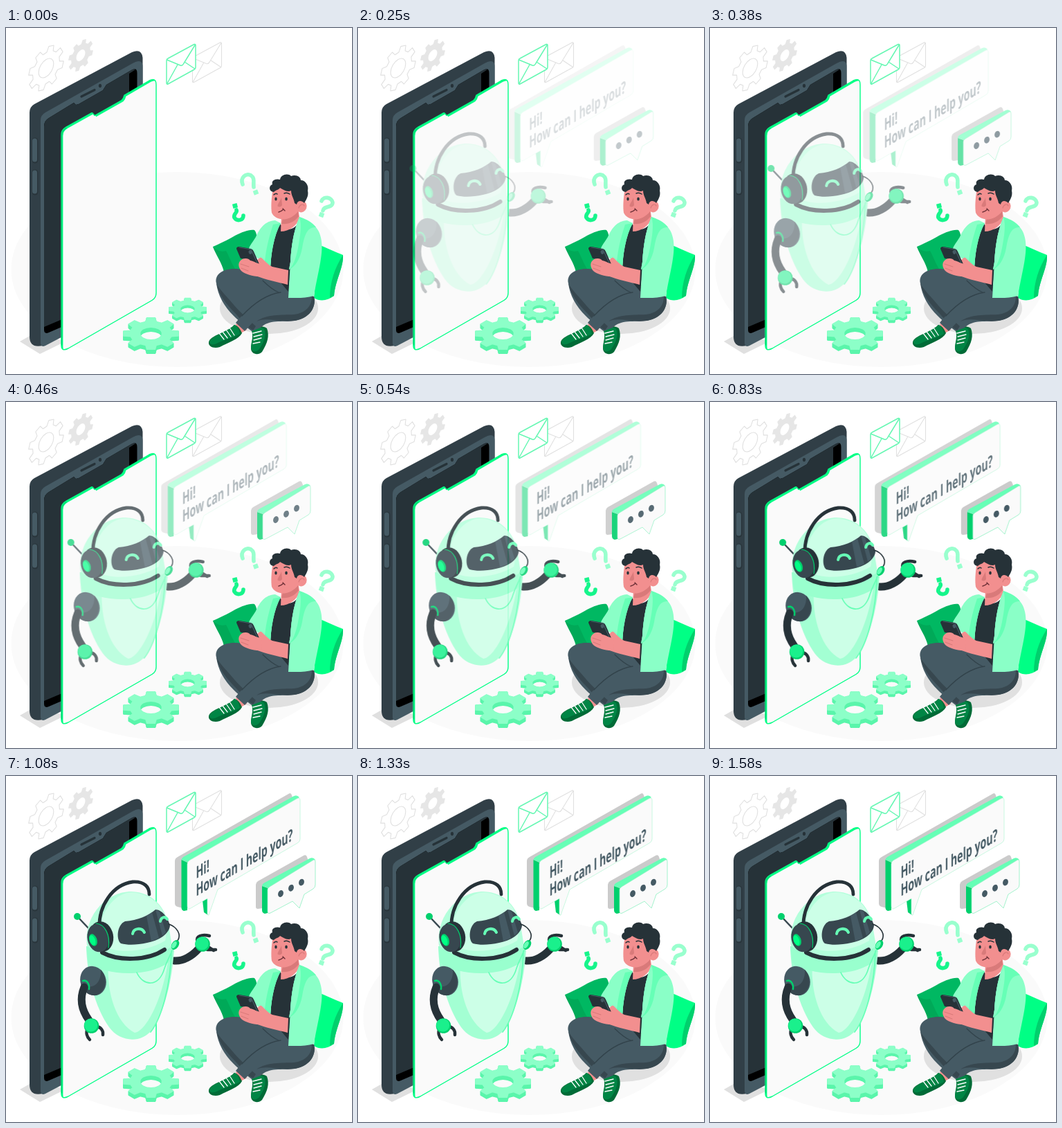
Write an HTML page with a canvas that moves like this. It is 500 px wide and 500 px high and loops after 1.62 s.

```html
<!DOCTYPE html>
<html lang="en">
<head>
<meta charset="utf-8">
<title>Robot assistant</title>
<style>
html, body { margin: 0; width: 100%; height: 100%; overflow: hidden; background: #fff; }
canvas { display: block; width: 500px; height: 500px; }
</style>
</head>
<body>
<canvas id="stage"></canvas>
<script>
const SIZE = 500, LOOP = 1620;
const C = {
  green: '#00ff85', mid: '#00d06d', deep: '#00a958', shoe: '#008545', forest: '#006b37',
  mint: '#99ffce', jacket: '#8affc7', pale: '#ccffe7', fresh: '#66ffb6',
  ink: '#263238', side: '#313f47', slate: '#37474f', steel: '#455a64',
  skin: '#f28f8f', blush: '#d97a7a', paper: '#fafafa', gray: '#e0e0e0', shadow: '#cbcbcb'
};
const ratio = window.devicePixelRatio || 1;
let g;

function prepare(canvas) {
  canvas.width = canvas.height = SIZE * ratio;
  const ctx = canvas.getContext('2d');
  ctx.scale(ratio, ratio);
  ctx.lineCap = ctx.lineJoin = 'round';
  return ctx;
}

function layer(draw) {
  const canvas = document.createElement('canvas');
  g = prepare(canvas);
  draw();
  return canvas;
}

function fill(color, path) {
  g.fillStyle = color;
  g.fill(new Path2D(path));
}

function line(color, width, path) {
  g.strokeStyle = color;
  g.lineWidth = width;
  g.stroke(new Path2D(path));
}

function oval(color, x, y, rx, ry = rx, turn = 0) {
  g.fillStyle = color;
  g.beginPath();
  g.ellipse(x, y, rx, ry, turn, 0, Math.PI * 2);
  g.fill();
}

// Cog outline with a round hole, seen on a plane given by a 2x2 matrix.
function cog(x, y, radius, teeth, hole, plane, turn = 0) {
  const flat = new Path2D(), step = Math.PI * 2 / teeth;
  for (let i = 0; i < teeth; i++) {
    for (const [part, r] of [[-.32, .76], [-.19, 1], [.19, 1], [.32, .76]]) {
      const a = turn + (i + part) * step;
      flat.lineTo(radius * r * Math.cos(a), radius * r * Math.sin(a));
    }
  }
  flat.closePath();
  flat.moveTo(hole, 0);
  flat.arc(0, 0, hole, 0, Math.PI * 2);
  const path = new Path2D();
  path.addPath(flat, new DOMMatrix([...plane, x, y]));
  return path;
}

function floorCog(x, y, radius, hole, depth) {
  for (let d = depth; d >= 0; d -= .5) {
    const path = cog(x, y + d, radius, 8, hole, [1, 0, 0, .577]);
    g.fillStyle = g.strokeStyle = d ? '#5af5ab' : '#8cffc8';
    g.lineWidth = 1.5;
    g.fill(path, 'evenodd');
    g.stroke(path);
  }
}

function backdrop() {
  const wall = [.866, -.5, 0, 1];
  g.fillStyle = '#fff';
  g.fillRect(0, 0, SIZE, SIZE);
  oval(C.paper, 247.5, 349, 240, 141);

  g.strokeStyle = C.gray;
  g.lineWidth = 1.1;
  g.stroke(cog(58, 58, 29.5, 8, 12.5, wall, .3));
  g.fillStyle = '#e6e6e6';
  g.fill(cog(108, 39.5, 21, 8, 7.5, wall, .3), 'evenodd');

  const letter = 'M232 47Q232 45 234 44L272 23.5Q274 23 274 25V57Q274 59 272 60L234 81Q232 82 232 79ZM232.5 46L252 54Q255 55 257 51L273.5 24M233 80L248 53M273 59L258 49';
  g.save();
  g.translate(37.5, -2.5);
  line(C.gray, 1.1, letter);
  g.restore();
  fill('#fff', letter);
  line('#66f7b3', 1.5, letter);
}

function phone() {
  fill(C.gray, 'M20 453L36 444L88 452L49 471Z');
  fill(C.side, 'M34 122Q34 114 41 110L182 35Q196 29 197.5 43V385L53 459Q34 463 34 446Z');
  fill(C.steel, 'M50 133Q50 126 57 122L183 51Q197.5 43 197.5 56V385L57 459Q50 462 50 455Z');
  const screen = 'M55 142Q55 134 62 130L98 108L101 111L105 110L140 90L145 82L181 61Q189.5 56 189.5 65V385L62 440Q55 443 55 436Z';
  fill('#000', screen);
  g.save();
  g.clip(new Path2D(screen));
  fill(C.ink, 'M50 50H178V380L50 434Z');
  fill(C.ink, 'M178 50H190V58L178 66Z');
  g.restore();
  line(C.ink, 3.2, 'M109 99L128 89.5');
  oval(C.ink, 136, 83.5, 2.1, 2.8);
  for (const y of [161, 207]) {
    line('#29353b', 9, `M42 ${y + 2}V${y + 30}`);
    line(C.steel, 7, `M41.5 ${y + 2}V${y + 29}`);
  }

  const panel = 'M80 154Q80 147 87 143L123 123Q125 122 126 124L128 126.5L167 104.5Q170 102 171 97L207 76Q217 71 217 82V383Q217 390 211 393.5L90 463Q80 468 80 459Z';
  fill(C.green, panel);
  g.save();
  g.clip(new Path2D(panel));
  g.translate(2.4, 1.8);
  fill(C.paper, panel);
  g.restore();
  line(C.green, 1.4, panel);
  line(C.mid, 1.2, 'M80.5 458V155Q81 148 87 144.5');
}

function questionMark(color, hook, x, y, turn) {
  line(color, 5.6, hook);
  g.save();
  g.translate(x, y);
  g.rotate(turn);
  g.fillStyle = color;
  g.fillRect(-3.4, -3.2, 6.8, 6.4);
  g.restore();
}

function shoes() {
  fill(C.skin, 'M332 428L342 424L348 436L338 442Z');
  fill(C.forest, 'M330 429C335 430 338 434 341 441C336 450 322 454 309 461C300 464 292 460 293 454C295 444 318 441 330 429Z');
  fill(C.shoe, 'M330 429C337 432 337 440 338 442C328 448 315 450 304 456C298 459 294 457 294 453C298 444 318 441 330 429Z');
  line('#fff', 1.3, 'M308 441L315 450M313 439L320 448M318 436L325 446M323 433L330 444');
  fill(C.skin, 'M356 429L371 427L370 439L356 440Z');
  fill(C.forest, 'M355 437C360 431 371 429 377 434C381 445 378 455 370 468C364 474 354 471 354 463C354 454 358 447 355 437Z');
  fill(C.shoe, 'M355 437C360 433 368 431 373 435C377 444 373 454 366 464C361 470 354 467 354 462C355 453 359 447 355 437Z');
  line('#fff', 1.3, 'M357 441L369 438M358 446L370 443M358 451L369 448M357 456L367 454');
}

function legs() {
  fill(C.steel, 'M304 369C301 357 312 348 330 348C350 348 380 356 409 374L445 388C449 404 438 420 417 423C398 425 380 421 368 433L355 438C345 430 338 425 329 416C315 402 306 386 304 369Z');
  fill(C.slate, 'M304 369C308 386 318 399 332 413L347 430L357 437L361 431C348 419 335 408 324 394C317 386 308 377 304 369Z');
  fill(C.steel, 'M445 388C447 402 436 418 416 423C395 424 374 416 357 425L345 438L332 426C347 407 370 389 393 382Z');
  fill(C.slate, 'M445 388C449 404 438 420 417 423C394 426 377 417 362 424C377 413 398 415 416 414C433 412 442 402 442 388Z');
  line('#32434b', 1.3, 'M341 416C355 401 375 385 397 382M394 382C384 378 377 371 371 365');
}

function head() {
  fill(C.skin, 'M398 270L422 259L424 274C421 286 409 294 397 294Z');
  fill(C.blush, 'M400 276C410 276 417 271 422 265L423 272C417 280 409 284 398 283Z');
  fill(C.skin, 'M386 232C383 247 383 260 384 267C387 274 397 278 405 276C415 274 423 266 428 254L424 224L397 221Z');
  oval(C.skin, 427, 258, 7.5, 8.5, .3);
  line(C.blush, 1.2, 'M423 260C425 254 430 254 431 257');
  fill(C.ink, 'M387 237C380 237 379 228 385 226C383 220 390 217 396 219C397 212 407 209 412 214C419 211 426 215 426 220C433 220 438 228 436 235C438 243 433 249 431 253C426 248 421 250 420 255L417 253C416 246 412 242 412 235C406 238 400 233 396 231C394 234 390 234 387 237Z');
  fill(C.blush, 'M398 245C396 251 391 256 393 258C396 259 398 258 399 256Z');
  oval(C.ink, 390, 247, 1.7, 2.5);
  oval(C.ink, 405, 247, 1.8, 2.6);
  line(C.ink, 1.5, 'M387 241Q390 238 392 240M402 239Q406 237 410 240');
  line('#6d3037', 1.4, 'M394 266Q398 265 401 262M400 261L403 264');
}

function pillows() {
  fill('#00b862', 'M299 316C308 312 321 306 331 300C342 295 350 291 359 292C364 298 361 305 366 315L354 354L315 352C312 339 304 329 299 316Z');
  fill(C.deep, 'M299 316C304 322 311 324 318 322C323 331 327 343 333 351L315 352C312 339 304 329 299 316Z');
  fill(C.green, 'M452 313C462 317 476 324 487 328C488 346 476 364 474 387C465 394 454 396 445 390Z');
  fill(C.mid, 'M487 328C488 346 476 364 474 387L468 390C468 368 475 346 487 328Z');
}

function person() {
  oval(C.gray, 380, 405, 71, 37);
  pillows();
  shoes();
  legs();
  fill(C.ink, 'M395 282C386 303 382 330 382 350L408 381L413 338L424 280C412 298 401 289 395 282Z');
  head();
  fill(C.jacket, 'M389 278C374 279 367 289 361 302C355 312 349 317 351 324L370 337L382 353C382 329 387 300 397 282Z');
  fill(C.fresh, 'M386 284C381 300 376 316 374 338L382 353C382 329 387 300 397 282Z');
  fill(C.jacket, 'M424 273C437 278 452 286 455 303C460 324 451 351 445 387C432 391 419 390 408 390L411 338C413 310 416 294 424 273Z');
  fill(C.fresh, 'M424 273C434 276 443 281 448 288C434 287 431 302 428 318C425 334 418 345 409 349L411 338C413 310 416 294 424 273Z');
  fill(C.jacket, 'M424 273C428 284 425 302 422 318C419 333 415 344 409 349L411 338C413 310 416 294 424 273Z');
  fill(C.skin, 'M408 350L407 371C393 367 375 364 361 358C353 355 345 355 340 350C336 345 337 335 344 333L355 337C363 340 365 330 369 332C373 335 378 342 385 345Z');
  fill(C.ink, 'M333 319Q333 316 337 316L354 319Q357 320 358 323L369 348Q369 351 365 351L355 351L348 334L339 333Z');
  line(C.steel, 1.2, 'M337 317L354 320L367 348');
  oval(C.steel, 353, 324, 2.3, 3, -.3);
  fill(C.skin, 'M338 337C342 332 350 332 353 336C359 337 363 341 369 341L370 359C359 360 346 356 340 351C336 346 335 341 338 337Z');
  line(C.blush, 1.1, 'M339 341L351 345M340 347L350 351');
  questionMark(C.mint, 'M342 226C338 216 347 209 354 213C360 217 357 223 358 230', 361, 237.5, -.35);
  questionMark(C.mint, 'M456 250C459 242 471 245 472 252C472 261 459 256 458 264', 456, 270, .35);
  questionMark('#16f58b', 'M343 271C343 278 334 280 330 274C328 268 335 267 333 263', 331, 257, -.25);
}

function wrist(x, y) {
  oval(C.mid, x, y, 10.8);
  oval('#1af08c', x - .8, y - 1, 9.6);
}

function robot() {
  line(C.ink, 11, 'M243 267C256 268 269 260 278 250');
  line(C.ink, 4.5, 'M277 239C273 232 283 228 294 231M291 251L303 251M292 247L300 252');
  wrist(284, 243);

  line(C.slate, 2.5, 'M104 204L123 224');
  oval(C.mid, 103, 203, 5);
  fill('#a3ffd3', 'M116 246C117 290 129 335 149 363C164 384 194 387 210 368C228 344 241 295 243 247Z');
  fill(C.pale, 'M148 270C145 315 160 358 186 371C204 368 227 318 234 268Z');
  fill(C.mint, 'M116 246L243 247L241 264C214 292 146 290 119 270Z');
  line(C.fresh, 1.7, 'M189 284C198 304 221 306 229 278C233 266 237 260 240 252M239 253C238 302 225 350 209 370');

  fill('#b3ffdb', 'M117 245C112 202 145 167 181 167C213 168 230 190 235 216L240 246C210 269 143 270 117 245Z');
  fill(C.pale, 'M139 205C148 182 164 169 181 168C212 170 229 190 234 216L230 238C204 254 161 258 140 245Z');
  line(C.ink, 6, 'M139 255C163 268 205 267 229 251');
  fill(C.slate, 'M172 210C190 209 207 201 216 193C225 193 234 204 237 216C236 228 221 238 204 241C190 244 177 245 166 242C159 237 160 215 172 210Z');
  fill(C.steel, 'M203 202L211 197L221 234L210 239ZM216 193L222 196L231 226L226 231Z');
  line(C.fresh, 4, 'M183 228C184 220 196 218 200 226M223 210C224 204 230 202 233 207');

  line(C.ink, 4.8, 'M135 218C134 189 153 157 183 153C201 152 207 161 207 171');
  oval(C.ink, 138, 232, 17, 22, -.2);
  oval(C.slate, 133, 234, 15.5, 20.5, -.2);
  line(C.mid, 1.2, 'M130 213C143 214 151 230 148 248');
  oval(C.mid, 126, 237, 5.5, 9, -.35);
  oval(C.green, 125, 237.5, 4, 7.5, -.35);
  line(C.ink, 1.6, 'M235 214C247 218 254 229 248 238');
  oval(C.mid, 244.5, 244, 5, 7.5, .55);
  oval(C.fresh, 243, 244, 3, 5.5, .55);

  oval(C.steel, 126, 296, 18.5, 21.5, -.35);
  fill(C.slate, 'M137 280C148 292 145 312 130 317C118 318 111 310 108 300C122 310 138 303 137 280Z');
  line(C.mid, 2.5, 'M111 296C117 294 121 301 120 308');
  line(C.ink, 11, 'M113 305C106 322 109 338 120 353');
  line(C.ink, 4.5, 'M118 365C115 371 117 377 121 381M130 362C136 362 141 367 140 374');
  wrist(123.5, 361);
}

function speech() {
  fill(C.shadow, 'M244 123Q244 119 248 117L408 26Q412 23 413 28L417 40L260 192L248 189Q244 188 244 184Z');
  fill(C.mid, 'M253.5 121L262 125V194L257 195Q253.5 194 253.5 190Z');
  fill(C.fresh, 'M253.5 121Q254 118 258 116L416 29Q421 27 424 31L263 125Z');
  fill(C.mid, 'M284 180L286 197L292 201L294 176Z');
  const face = 'M262 127Q262 124 265 122L420 33Q425 30 425 35V91Q425 95 421 97L306 164L293 201Q291 202 291 199V177L267 191Q262 194 262 188Z';
  fill(C.paper, face);
  line('#b4f5d5', .7, face);
}

// Lettering lies in the plane of the speech bubble.
function lettering() {
  g.fillStyle = C.steel;
  g.font = '700 24px "Open Sans", "Noto Sans", sans-serif';
  [['Hi!', 148.5], ['How can I help you?', 174]].forEach(([text, y]) => {
    g.save();
    g.transform(.59, -.342, 0, 1, 274.5, y);
    g.fillText(text, 0, 0);
    g.restore();
  });
}

function typing() {
  fill(C.shadow, 'M361 157Q361 154 364 152L430 115Q434 113 435 117L438 126L378 190L364 192Q361 192 361 189Z');
  fill(C.mid, 'M370 159L378 162V198L374 199Q370 198 370 194Z');
  fill(C.fresh, 'M370 159Q370 156 374 154L439 119Q444 117 447 121L379 162Z');
  const face = 'M378 164Q378 162 381 160L443 122Q447 119 447 124V157Q447 161 444 163L431 171L424 191L414 181L382 198Q378 200 378 195Z';
  fill(C.paper, face);
  line('#8cf0c0', .8, face);
  for (const i of [0, 1, 2]) oval(C.steel, 397 + 15 * i, 170 - 8.2 * i, 3.8, 5, .35);
}

const scene = layer(() => {
  backdrop();
  phone();
  floorCog(209.5, 441.5, 40, 16, 6);
  floorCog(262.5, 406, 27, 11, 4);
  person();
});
const robotLayer = layer(robot);
const speechLayer = layer(speech);
const textLayer = layer(lettering);
const typingLayer = layer(typing);

// cubic-bezier(.36, -.01, .5, 1.38): slides in and overshoots a little.
function ease(x) {
  if (x <= 0) return 0;
  if (x >= 1) return 1;
  const curve = (s, a, b) => 3 * a * s * (1 - s) ** 2 + 3 * b * s * s * (1 - s) + s ** 3;
  let low = 0, high = 1;
  for (let i = 0; i < 24; i++) {
    const s = (low + high) / 2;
    if (curve(s, .36, .5) < x) low = s; else high = s;
  }
  return curve(low, -.01, 1.38);
}

const stage = prepare(document.getElementById('stage'));

function slide(image, progress, distance) {
  stage.globalAlpha = Math.max(0, Math.min(1, progress));
  stage.drawImage(image, (progress - 1) * distance, 0, SIZE, SIZE);
}

function render(now) {
  const t = now % LOOP;
  stage.globalAlpha = 1;
  stage.drawImage(scene, 0, 0, SIZE, SIZE);
  if (t >= 80) {
    const speechIn = ease((t + 180) / 1850);
    slide(robotLayer, ease((t + 20) / 1000), 32);
    slide(speechLayer, Math.min(1, speechIn), 34);
    slide(textLayer, speechIn, 34);
    slide(typingLayer, ease((t + 50) / 1000), 30);
  }
  requestAnimationFrame(render);
}

render(0);
</script>
</body>
</html>
```
